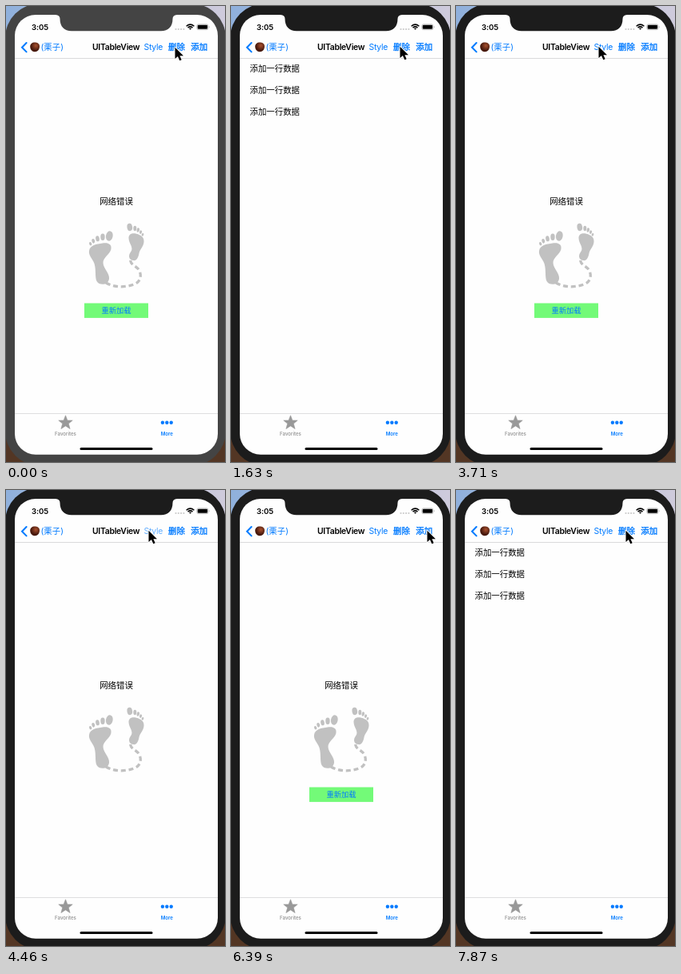
Write an HTML page that moves like this. It is 274 by 570 pixels and loops after 8000 ms.

```html
<!DOCTYPE html>
<html lang="zh-CN">
<head>
<meta charset="utf-8">
<title>UITableView</title>
<style>
  html, body { margin: 0; width: 100%; height: 100%; overflow: hidden; }
  svg { display: block; width: 274px; height: 570px; }
  text { font: 10.43px Inter, "Noto Sans CJK SC", "Noto Sans CJK", sans-serif; }
  .blue { fill: #007aff; }
  .medium { stroke: #007aff; stroke-width: .35px; }
  .title { font-weight: 600; letter-spacing: -.3px; }
  .tight { letter-spacing: -.26px; }
  .clock { font-size: 9.6px; font-weight: 600; letter-spacing: -.1px; }
  .tab { font-size: 6.13px; font-weight: 500; text-anchor: middle; }
  .reload { font-size: 9.3px; text-anchor: middle; }

  .anim { animation: 8s step-end -4ms infinite; }
  .case { fill: #1c1c1c; animation-name: wake; }
  .add { animation-name: add; }
  .remove { animation-name: remove; }
  .style { animation-name: style; }
  .row1 { animation-name: row1; }
  .row2 { animation-name: row2; }
  .row3 { animation-name: row3; }
  .empty { animation-name: empty; }
  .retry { animation-name: retry; }
  .cursor { animation-name: cursor; }

  @keyframes wake {
    0% { fill: #444; }
    5.5%, 100% { fill: #1c1c1c; }
  }

  /* bar buttons dim on touch */
  @keyframes add {
    0%, 9.25%, 13%, 16.625%, 85.375%, 90.875%, 94.625%, 100% { opacity: 1; }
    7.375%, 11.125%, 14.75%, 83.5%, 89.125%, 92.75% { opacity: .2; }
  }
  @keyframes remove {
    0%, 31.5%, 37.125%, 44.5%, 100% { opacity: 1; }
    27.75%, 33.375%, 40.875% { opacity: .2; }
    29.625%, 35.25%, 42.75% { opacity: .65; }
  }
  @keyframes style {
    0%, 57.625%, 68.75%, 100% { opacity: 1; }
    53.875%, 65% { opacity: .2; }
    55.75%, 66.875% { opacity: .6; }
  }

  /* table contents */
  @keyframes row1 {
    0%, 42.75% { opacity: 0; }
    9.25%, 85.375%, 100% { opacity: 1; }
  }
  @keyframes row2 {
    0%, 35.25% { opacity: 0; }
    13%, 90.875%, 100% { opacity: 1; }
  }
  @keyframes row3 {
    0%, 29.625% { opacity: 0; }
    16.625%, 94.625%, 100% { opacity: 1; }
  }
  @keyframes empty {
    0%, 42.75% { opacity: 1; }
    9.25%, 85.375%, 100% { opacity: 0; }
  }
  @keyframes retry {
    0%, 66.875%, 100% { opacity: 1; }
    55.75% { opacity: 0; }
  }

  @keyframes cursor {
    0% { transform: translate(211px, 51px); }
    1.875% { transform: translate(211px, 51px); animation-timing-function: steps(4, start); }
    9.2% { transform: translate(239px, 53px); }
    18.5% { transform: translate(239px, 53px); animation-timing-function: steps(2, start); }
    22.25% { transform: translate(211px, 50px); }
    44.5% { transform: translate(211px, 50px); animation-timing-function: steps(2, start); }
    48.25% { transform: translate(178px, 50px); }
    70.5% { transform: translate(178px, 50px); animation-timing-function: steps(2, start); }
    74.25% { transform: translate(215px, 50px); }
    78% { transform: translate(215px, 50px); animation-timing-function: steps(2, start); }
    81.75% { transform: translate(245px, 50px); }
    96.5% { transform: translate(245px, 50px); animation-timing-function: steps(2, start); }
    100% { transform: translate(212px, 50px); }
  }
</style>
</head>
<body>
<svg viewBox="0 0 274 570">
  <defs>
    <linearGradient id="sky">
      <stop offset="0" stop-color="#8fb0dc"/>
      <stop offset="1" stop-color="#cfcbdc"/>
    </linearGradient>
    <radialGradient id="nut" cx=".6" cy=".35">
      <stop offset="0" stop-color="#a8502e"/>
      <stop offset="1" stop-color="#48190d"/>
    </radialGradient>
  </defs>

  <!-- phone -->
  <rect width="274" height="285" fill="url(#sky)"/>
  <rect y="285" width="274" height="285" fill="#533624"/>
  <rect class="anim case" x="-1" y="-3" width="276" height="577.5" rx="43"/>
  <rect x="11" y="11" width="254" height="549.7" rx="26" fill="#fefefe"/>
  <path class="anim case" d="M62 10.5H214V11Q208.500 11.5 208.500 16C208.500 26 203 31.200 194 31.200H82C73 31.200 67.500 26 67.500 16Q67.500 11.5 62 11Z"/>

  <!-- status bar -->
  <text class="clock" x="32" y="30">3:05</text>
  <g fill="#c9c9c9">
    <circle cx="212.5" cy="29" r="1.1"/><circle cx="215.8" cy="29" r="1.1"/>
    <circle cx="219.1" cy="29" r="1.1"/><circle cx="222.4" cy="29" r="1.1"/>
  </g>
  <g fill="none" stroke="#000" stroke-width="1.5">
    <path d="M225.6 25.2Q230.5 21 235.4 25.2M227.5 27.1Q230.5 24.6 233.5 27.1"/>
    <path d="M228.9 28L230.5 29.8L232.1 28Q230.5 26.9 228.9 28Z" fill="#000" stroke="none"/>
  </g>
  <rect x="238.8" y="22.9" width="14.2" height="6.8" rx="2" fill="none" stroke="#999" stroke-width=".6"/>
  <rect x="239.7" y="23.8" width="12.4" height="5" rx="1.2"/>
  <path d="M253.9 25Q255.2 26.3 253.9 27.6Z" fill="#999"/>

  <!-- navigation bar -->
  <path d="M11 65.5H265" stroke="#dadadc"/>
  <path d="M25.6 46L20 51.7L25.6 57.4" fill="none" stroke="#007aff" stroke-width="2" stroke-linecap="round"/>
  <path d="M30.2 51C30 47 33.5 45 37 45.5C40 46 42.3 47.5 42 51C41.7 55 39 57.5 35.8 57.2C32.5 57 30.4 54.5 30.2 51Z" fill="url(#nut)"/>
  <text class="blue" x="43.5" y="55.3">(栗子)</text>
  <text class="title" x="108" y="55.3">UITableView</text>
  <text class="anim blue tight style" x="172.5" y="55.3">Style</text>
  <text class="anim blue medium remove" x="203" y="55.3">删除</text>
  <text class="anim blue medium add" x="231.3" y="55.3">添加</text>

  <!-- rows -->
  <text class="anim row1" x="23.5" y="82.2">添加一行数据</text>
  <text class="anim row2" x="23.5" y="109.2">添加一行数据</text>
  <text class="anim row3" x="23.5" y="136.2">添加一行数据</text>

  <!-- empty view -->
  <g class="anim empty">
    <text x="138" y="247.8" text-anchor="middle">网络错误</text>
    <g fill="#c1c1c1">
      <path d="M104 306C105 299 113 297.5 121 296.5C128 295.5 133 298 131.3 304.5C129.500 311 121.500 314 121.500 321C121.500 328 130 334 129 341C128 349 117 350 113.500 344C111 339 113 330 110.500 322C108 315 103 312 104 306Z"/>
      <ellipse cx="129.3" cy="287.5" rx="4.3" ry="6.2" transform="rotate(12 129.3 287.5)"/>
      <ellipse cx="121" cy="288.8" rx="2.7" ry="4.2"/>
      <ellipse cx="114.5" cy="290.8" rx="2.3" ry="3.5" transform="rotate(-10 114.5 290.8)"/>
      <ellipse cx="109.3" cy="293.8" rx="1.9" ry="2.9" transform="rotate(-15 109.3 293.8)"/>
      <ellipse cx="105.7" cy="297.2" rx="1.6" ry="2.3" transform="rotate(-20 105.7 297.2)"/>
      <path d="M153.5 290C153.5 285 158 283.5 163 284.800C169 286.3 173 289 172.5 295C172 301 167.500 304 166.500 309C165.5 315 163 319 159 318C153 317 153 311 156 307.500C160.500 302 153.5 297 153.5 290Z"/>
      <ellipse cx="154.8" cy="276.5" rx="3.3" ry="4.7" transform="rotate(-8 154.8 276.5)"/>
      <ellipse cx="161.3" cy="278" rx="2" ry="3.2"/>
      <ellipse cx="165.3" cy="280" rx="1.7" ry="2.7" transform="rotate(12 165.3 280)"/>
      <ellipse cx="168.5" cy="282.6" rx="1.5" ry="2.3" transform="rotate(16 168.5 282.6)"/>
      <ellipse cx="171" cy="285.8" rx="1.3" ry="1.9" transform="rotate(20 171 285.8)"/>
    </g>
    <path d="M155.5 318C157 325 164 325 167 331C170 338 168 345 160 348C149 352 136 352 125 346" fill="none" stroke="#c1c1c1" stroke-width="3.3" stroke-dasharray="6 3.8"/>
    <g class="anim retry">
      <rect x="98" y="371.5" width="80" height="18.4" fill="#73fa78"/>
      <text class="blue reload" x="138" y="384.3">重新加载</text>
    </g>
  </g>

  <!-- tab bar -->
  <path d="M11 509.5H265" stroke="#dedee0"/>
  <path d="M74.5 511.8L76.9 518H83.2L78.3 522.1L80.1 528.6L74.5 524.9L68.9 528.6L70.7 522.1L65.8 518H72.1Z" fill="#999" stroke="#999" stroke-width=".6" stroke-linejoin="round"/>
  <g class="blue">
    <circle cx="195.9" cy="520.7" r="2.2"/><circle cx="201.3" cy="520.7" r="2.2"/><circle cx="206.7" cy="520.7" r="2.2"/>
  </g>
  <text class="tab" x="74.5" y="537" fill="#8f8f8f">Favorites</text>
  <text class="tab blue" x="201.3" y="537" style="font-weight:600">More</text>
  <rect x="92.5" y="552" width="91" height="3" rx="1.5"/>

  <!-- pointer -->
  <g class="anim cursor">
    <path d="M.5 .8V15L3.900 12L6.300 17.300L8.700 16.200L6.400 11.200H11Z" stroke="#fff" stroke-width="1.8" stroke-linejoin="round" paint-order="stroke"/>
  </g>
</svg>
</body>
</html>
```
